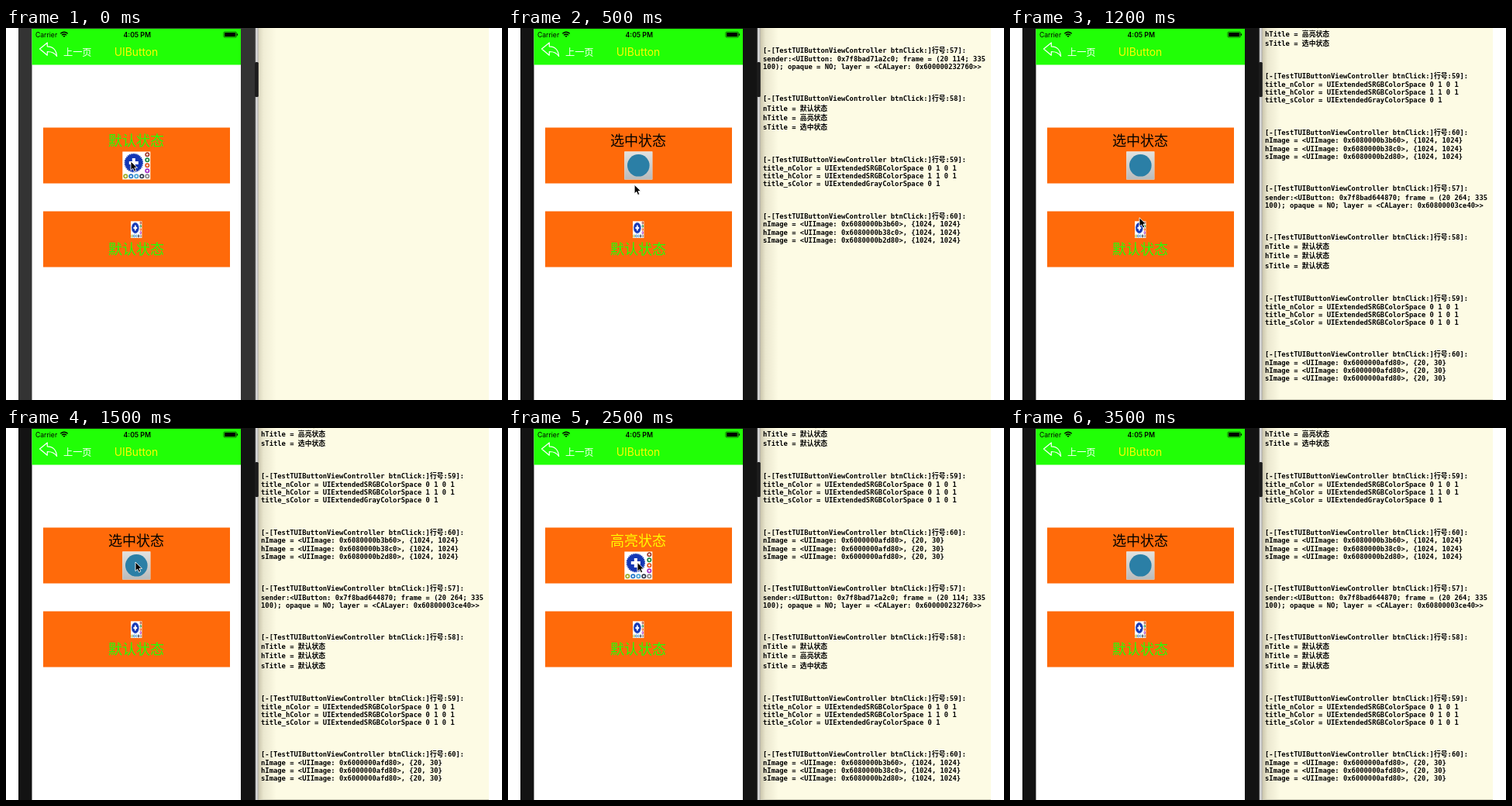
Animation, 640 px wide and 480 px high, one loop 3.6 s. Source, as an HTML page:

```html
<!DOCTYPE html>
<html lang="zh-CN">
<head>
<meta charset="utf-8">
<style>
  html, body { margin: 0; width: 100%; height: 100%; overflow: hidden; background: #fff; }
  svg { display: block; width: 640px; height: 480px; }
  text { font-family: Inter, "Noto Sans CJK SC", "Noto Sans CJK", sans-serif; white-space: pre; }
  .log text { font: bold 8.84px "DejaVu Sans Mono", "Noto Sans CJK SC", "Noto Sans CJK", monospace; }
  .title { font-size: 18px; text-anchor: middle; }
</style>
</head>
<body>
<svg viewBox="0 0 640 480">
  <defs>
    <linearGradient id="shade">
      <stop offset="0" stop-color="#6b5f40" stop-opacity=".36"/>
      <stop offset=".3" stop-color="#6b5f40" stop-opacity=".13"/>
      <stop offset="1" stop-color="#6b5f40" stop-opacity="0"/>
    </linearGradient>
    <linearGradient id="edge">
      <stop offset="0" stop-color="#777"/>
      <stop offset=".4" stop-color="#e8e8e8"/>
      <stop offset="1" stop-color="#aaa"/>
    </linearGradient>
    <linearGradient id="tile" x2="0" y2="1">
      <stop offset="0" stop-color="#e2e2e0"/>
      <stop offset="1" stop-color="#b9bbbb"/>
    </linearGradient>
    <g id="plus">
      <rect width="36" height="36" fill="#fff"/>
      <circle cx="14.5" cy="14.5" r="11.2" fill="#1437b4"/>
      <circle cx="14.5" cy="14.5" r="11.6" fill="none" stroke="#1437b4" stroke-width="1.2" stroke-dasharray="1.6 .8"/>
      <path d="M14.5 8.5v12M8.5 14.5h12" stroke="#fff" stroke-width="4"/>
      <g id="rings" fill="none" stroke-width="1.7"></g>
    </g>
  </defs>

  <rect x="322" width="301" height="480" fill="#fdfbe4"/>
  <rect id="shadow" x="325" width="24" height="480" fill="url(#shade)"/>
  <path id="rule" d="M326 479.5H623" stroke="#cfcdb9"/>
  <g class="log" id="slot0"></g>
  <g class="log" id="slot1"></g>

  <rect id="body" x="16" width="306" height="480"/>
  <rect x="321.5" width="4" height="480" fill="url(#edge)"/>
  <rect x="321" y="44" width="4.8" height="45" rx="1.5" fill="#1c1c1c"/>
  <rect x="33.5" y="1" width="269.5" height="479" fill="#fff"/>
  <rect x="33.5" y="1" width="269.5" height="46.5" fill="#21ff06"/>

  <text x="38" y="11.6" font-size="8.6">Carrier</text>
  <g fill="none" stroke="#000" stroke-width="1.4">
    <path d="M70.3 7.3Q75 3.3 79.7 7.3M72 9.2Q75 6.7 78 9.2"/>
    <path d="M73.5 10.3Q75 9.2 76.5 10.3L75 12Z" fill="#000" stroke="none"/>
  </g>
  <text x="169.3" y="11.6" font-size="8.7" font-weight="600" text-anchor="middle">4:05 PM</text>
  <rect x="280.9" y="5" width="16.6" height="7" rx="1.6" fill="none" stroke="#000" stroke-width=".6"/>
  <rect x="282" y="6" width="14.4" height="5" rx=".8"/>
  <path d="M298.6 7.3v2.4" stroke="#000"/>

  <path d="M43.5 27L53.3 19V23.8C60 23.8 65 28 65.6 36.5C62.5 31.6 59 30.4 53.3 30.5V35.2Z" fill="none" stroke="#fff" stroke-width="1.2" stroke-linejoin="round"/>
  <text x="74" y="35.6" font-size="12.2" font-weight="300" fill="#fff">上一页</text>
  <text x="168" y="35.6" font-size="13.8" text-anchor="middle" fill="#fffb00">UIButton</text>

  <g fill="#ff6a0a">
    <rect x="48" y="128.5" width="241" height="72"/>
    <rect x="48" y="236.5" width="241" height="72"/>
  </g>
  <text class="title" id="title" x="168" y="152"></text>
  <use id="normal" href="#plus" x="150.3" y="159.5"/>
  <g id="chosen">
    <rect x="150.3" y="159.5" width="36" height="36" fill="url(#tile)"/>
    <circle cx="168.3" cy="177.3" r="14.3" fill="#2b7fa6"/>
  </g>
  <use href="#plus" transform="translate(161 249.3) scale(.4 .6)"/>
  <rect id="dim" x="161" y="249.3" width="14.4" height="21.6" opacity=".4"/>
  <text class="title" x="168" y="292" fill="#21ff06">默认状态</text>

  <path id="cursor" d="M0 0V11.6L2.7 9.1L4.5 13.2L6.7 12.2L4.9 8.3H8.5Z" stroke="#fff" stroke-width=".9"/>
</svg>
<script>
const LOOP = 3600, STEP = 100;
const $ = id => document.getElementById(id);
const NS = 'http://www.w3.org/2000/svg';

function add(parent, tag, attrs, text = '') {
  const el = document.createElementNS(NS, tag);
  for (const k in attrs) el.setAttribute(k, attrs[k]);
  el.textContent = text;
  parent.append(el);
}

['#a33a2a', '#198a3c', '#e2541b', '#a52bc4'].forEach((stroke, i) =>
  add($('rings'), 'circle', { cx: 32, cy: 3.8 + 7 * i, r: 2.2, stroke }));
['#9dac25', '#2377c8', '#48a4d4', '#333a4c', '#888'].forEach((stroke, i) =>
  add($('rings'), 'circle', { cx: 4 + 7 * i, cy: 31.8, r: 2.2, stroke }));

// Console output of the upper (A) and lower (B) button
const lineY = [28.5, 40, 50, 91, 103.5, 115.5, 128, 170, 181, 191, 201, 242.5, 253, 263.5, 273.5];
const head = n => `[-[TestTUIButtonViewController btnClick:]行号:${n}]:`;
const report = (button, top, layer, titles, colors, images, size) => {
  const rows = (name, list) => list.map((v, i) => name.replace('*', 'nhs'[i]) + ' = ' + v);
  return [
    head(57), `sender:<UIButton: ${button}; frame = (20 ${top}; 335`,
    `100); opaque = NO; layer = <CALayer: ${layer}>>`,
    head(58), ...rows('*Title', titles),
    head(59), ...rows('title_*Color', colors.map(c => 'UIExtended' + c)),
    head(60), ...rows('*Image', images.map(p => `<UIImage: ${p}>, {${size}}`))
  ];
};
const green = 'SRGBColorSpace 0 1 0 1';
const logs = {
  A: report('0x7f8bad71a2c0', 114, '0x600000232760', ['默认状态', '高亮状态', '选中状态'],
    [green, 'SRGBColorSpace 1 1 0 1', 'GrayColorSpace 0 1'],
    ['0x6080000b3b60', '0x6080000b38c0', '0x6080000b2d80'], '1024, 1024'),
  B: report('0x7f8bad644870', 264, '0x60800003ce40', Array(3).fill('默认状态'),
    Array(3).fill(green), Array(3).fill('0x6000000afd80'), '20, 30')
};

function showLogs(names) {
  const shift = names.length > 1 ? -108 : 0;
  [0, 1].forEach(i => {
    const slot = $('slot' + i);
    slot.replaceChildren();
    if (names[i]) logs[names[i]].forEach((line, j) =>
      add(slot, 'text', { x: 329, y: lineY[j] + 3.2 + shift + 286.5 * i }, line));
  });
  $('rule').style.display = names.length > 1 ? '' : 'none';
}

const titles = {
  normal: ['默认状态', '#21ff06'],
  pressed: ['高亮状态', '#fffb00'],
  selected: ['选中状态', '#000']
};
const states = [[0, 'normal'], [100, 'pressed'], [200, 'selected'], [2000, 'normal'], [2500, 'pressed'], [2600, 'selected']];
const output = [[0, ''], [200, 'A'], [1100, 'AB'], [2100, 'BA'], [2600, 'AA'], [3300, 'AB']];
const path = [[0, 161, 172], [300, 161, 172], [800, 167, 258], [1100, 167, 258], [1500, 167, 173],
  [2000, 167, 172], [2700, 167, 174], [2900, 165, 184], [3100, 167, 258], [LOOP, 167, 258]];

const at = (list, t) => list.findLast(e => e[0] <= t)[1];

function cursorAt(t) {
  const i = path.findIndex(p => p[0] > t), [t0, x0, y0] = path[i - 1], [t1, x1, y1] = path[i];
  const u = (t - t0) / (t1 - t0), k = u * u * (3 - 2 * u);
  return [x0 + (x1 - x0) * k, y0 + (y1 - y0) * k];
}

let shown;
function draw(now) {
  const t = Math.floor(now % LOOP / STEP) * STEP;
  const state = at(states, t), names = at(output, t), [label, color] = titles[state];
  if (names !== shown) showLogs(shown = names);
  $('title').textContent = label;
  $('title').setAttribute('fill', color);
  $('chosen').style.display = state === 'selected' ? '' : 'none';
  $('body').setAttribute('fill', t ? '#131313' : '#333');
  $('shadow').setAttribute('opacity', t ? 1 : .7);
  $('dim').style.display = t === 1000 || t === 3200 ? '' : 'none';
  $('cursor').setAttribute('transform', `translate(${cursorAt(t)})`);
  $('cursor').style.display = t < 3400 ? '' : 'none';
}

const start = performance.now();
function tick() {
  draw(performance.now() - start);
  requestAnimationFrame(tick);
}
tick();
</script>
</body>
</html>
```
